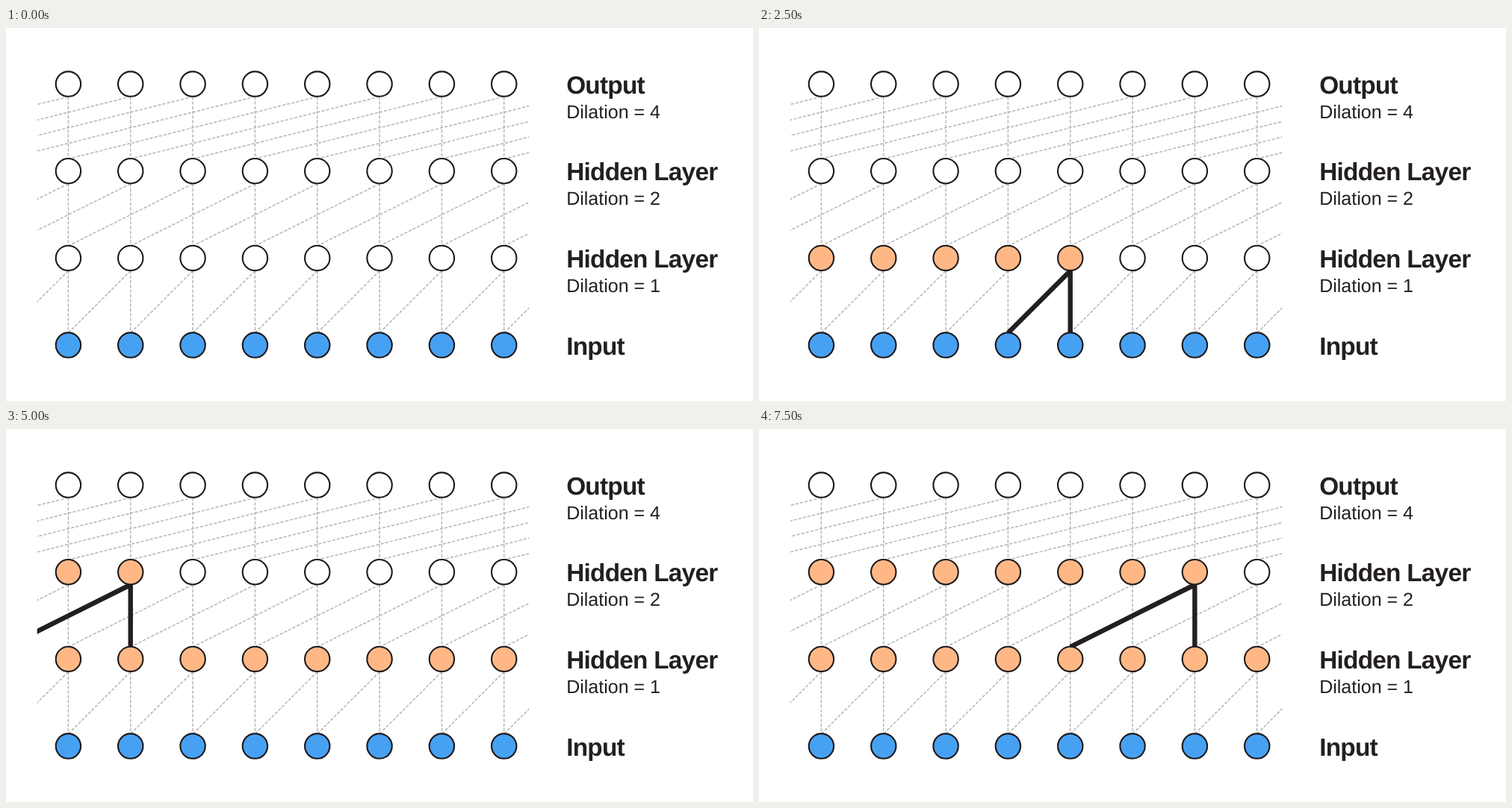
These frames come from a looping animation (1000x500 px, 8000 ms). An HTML page:

```html
<!DOCTYPE html>
<html lang="en">
<head>
<meta charset="utf-8">
<title>Dilated layers</title>
<style>
  html, body { margin: 0; width: 100%; height: 100%; overflow: hidden; background: #fff; }
  svg { display: block; width: 100%; height: 100%; }
  text { font-family: "Liberation Sans", Arial, sans-serif; fill: #231f20; text-rendering: geometricPrecision; }
  .title { font-size: 33.33px; font-weight: bold; letter-spacing: -0.74px; }
  .note { font-size: 25px; }
  .dash { fill: none; stroke: #b5b5b5; stroke-width: 1.5; stroke-dasharray: 4.2 2.1; }
  .active { fill: none; stroke: #231f20; stroke-width: 6.4; }
  .node { stroke: #1d191a; stroke-width: 2.1; }
</style>
</head>
<body>
<svg id="stage" viewBox="0 0 1000 500">
  <clipPath id="area"><rect x="41.7" y="0" width="658.6" height="500"/></clipPath>
</svg>
<script>
const COLS = 8, GAP_X = 83.33, GAP_Y = 116.67, RADIUS = 16.7;
const STEP = 500, LOOP = 8000;
const EMPTY = '#ffffff', BLUE = '#47a1f3', ORANGE = '#ffb885';
const LAYERS = [
  { title: 'Output', dilation: 4 },
  { title: 'Hidden Layer', dilation: 2 },
  { title: 'Hidden Layer', dilation: 1 },
  { title: 'Input', dilation: 0 }
];

const stage = document.getElementById('stage');
const colX = i => 83.4 + i * GAP_X;
const rowY = r => 75.1 + r * GAP_Y;

function add(parent, tag, attrs, label) {
  const el = document.createElementNS(stage.namespaceURI, tag);
  for (const key in attrs) el.setAttribute(key, attrs[key]);
  if (label) el.textContent = label;
  return parent.appendChild(el);
}

// Two links below a node: straight down, and back by the dilation.
function links(row, col) {
  const x = colX(col), top = rowY(row) + 17;
  return {
    x, top,
    bottom: top + GAP_Y - 2 * RADIUS,
    backX: x - LAYERS[row].dilation * GAP_X
  };
}

const lines = add(stage, 'g', { 'clip-path': 'url(#area)' });
LAYERS.forEach(({ dilation }, row) => {
  for (let col = 0; dilation && col < COLS + dilation; col++) {
    const { x, top, bottom, backX } = links(row, col);
    if (col < COLS) add(lines, 'path', { class: 'dash', d: `M${x} ${top}V${bottom}` });
    add(lines, 'path', { class: 'dash', d: `M${x} ${top}L${backX} ${bottom}` });
  }
});
const active = add(lines, 'path', { class: 'active' });

const nodes = LAYERS.map(({ title, dilation }, row) => {
  const y = rowY(row);
  add(stage, 'text', { class: 'title', x: 750.2, y: y + 12.4 }, title);
  if (dilation) add(stage, 'text', { class: 'note', x: 750.2, y: y + 45.4 }, `Dilation = ${dilation}`);
  return Array.from({ length: COLS }, (_, col) =>
    add(stage, 'circle', { class: 'node', cx: colX(col), cy: y, r: RADIUS }));
});

function render(time) {
  const lit = Math.floor((time % LOOP) / STEP);
  nodes.forEach((row, r) => row.forEach((node, col) => {
    const order = (2 - r) * COLS + col;
    node.setAttribute('fill', r === 3 ? BLUE : order < lit ? ORANGE : EMPTY);
  }));
  let d = '';
  if (lit) {
    const row = 2 - Math.floor((lit - 1) / COLS);
    const { x, top, bottom, backX } = links(row, (lit - 1) % COLS);
    d = `M${backX} ${bottom}L${x} ${top}V${bottom}`;
  }
  active.setAttribute('d', d);
}

const start = performance.now();
function tick() {
  render(performance.now() - start);
  requestAnimationFrame(tick);
}
tick();
</script>
</body>
</html>
```
